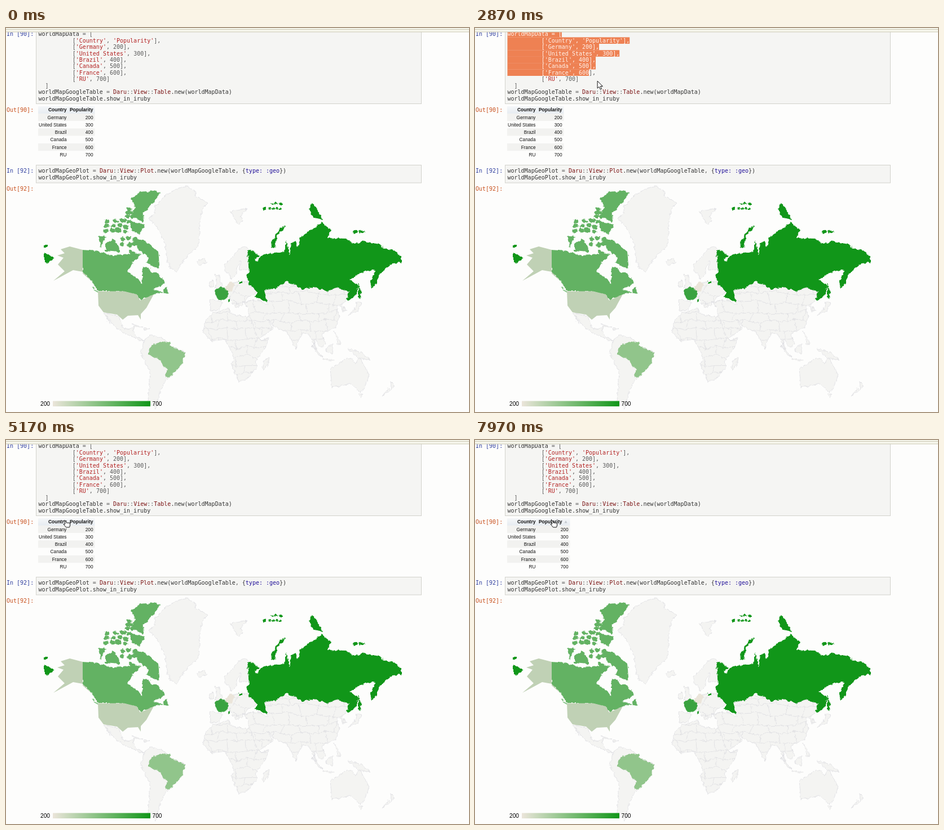
Recreate the animation shown at these times as an HTML page. Size 821 by 682 pixels, loop 8 s.

```html
<!DOCTYPE html>
<html lang="en">
<head>
<meta charset="utf-8">
<title>Notebook world map</title>
<style>
html, body { margin: 0; width: 100%; height: 100%; overflow: hidden; background: #fdfdfc; }
svg { display: block; }
text { white-space: pre; }
.code { font: 10px "DejaVu Sans Mono", monospace; fill: #333; }
.str { fill: #b32222; }
.const { fill: #7a1212; }
.atom { fill: #221199; }
.punct { fill: #5a5a5a; }
.in { fill: #303f9f; }
.out { fill: #c8501c; }
#selection text, #selection tspan { fill: #fff3ec; }
#table { font: 8.25px "Liberation Sans", Arial, sans-serif; fill: #111; text-anchor: end; }
#table .head { font-size: 8.5px; font-weight: bold; }
.legend { font: 10.2px "Liberation Sans", Arial, sans-serif; }
.cell { fill: #f5f5f3; stroke: #d2d2cc; }
.land { fill: #f4f4f2; stroke: #dadade; stroke-width: .7; }
#borders { fill: none; stroke: #dadade; stroke-width: .7; }
.canada { fill: #63b263; }
.usa { fill: #c0d1b5; }
.brazil { fill: #91c58b; }
.france { fill: #3aa340; }
.germany { fill: #ebe5da; }
.russia { fill: #119619; }
</style>
</head>
<body>
<svg width="821" height="682" viewBox="0 0 821 682">
  <defs>
    <filter id="coast" x="0" y="0" width="821" height="682" filterUnits="userSpaceOnUse" color-interpolation-filters="sRGB">
      <feTurbulence type="fractalNoise" baseFrequency=".17" numOctaves="2" seed="4"/>
      <feColorMatrix values="1 0 0 0 0 0 1 0 0 0 0 0 1 0 0 0 0 0 0 1" result="noise"/>
      <feDisplacementMap in="SourceGraphic" in2="noise" scale="6" xChannelSelector="R" yChannelSelector="G"/>
    </filter>
    <linearGradient id="scale"><stop stop-color="#ebe5da"/><stop offset="1" stop-color="#109618"/></linearGradient>
    <linearGradient id="header" x2="0" y2="1"><stop stop-color="#f5f7f9"/><stop offset="1" stop-color="#e7ecf1"/></linearGradient>
    <clipPath id="picked"><rect id="fullRows" width="821"/><rect id="lastRow" height="11.43"/></clipPath>
    <clipPath id="inland"><use href="#africa"/><use href="#asia"/><use href="#europe"/></clipPath>
  </defs>
  <rect width="821" height="682" fill="#fdfdfc"/>

  <g id="map">
    <g filter="url(#coast)">
      <g class="land">
        <path id="greenland" d="M253 338L264 330 264 317 284 297 300 287 322 281 337 291 335 298 358 311 349 320 344 344 342 386 316 411 302 434 290 424 285 408 282 384 268 354Z"/>
        <path id="iceland" d="M337 414L352 410 356 416 343 422Z"/>
        <path id="svalbard" d="M398 326L427 321 416 334 419 342 412 350Z"/>
        <path id="nordics" d="M388 432L388 420 403 405 413 393 424 388 432 392 428 397 432 418 430 428 414 430 417 414 409 425 409 436 400 447 396 436Z"/>
        <path id="britain" d="M371 437L377 439 383 456 381 461 370 463 374 455ZM362 450l6-2 0 10-7 2z"/>
        <path id="iberia" d="M362 482L384 486 378 500 363 503Z"/>
        <path id="europe" d="M389 470L400 453 427 448 436 462 446 468 430 478 424 485 416 495 402 481 413 494 409 498 397 482Z"/>
        <path id="asia" d="M457 467L480 461 490 452 515 459 546 460 570 468 585 461 608 468 608 477 596 491 603 503 597 503 594 494 586 494 592 512 584 532 560 543 567 560 558 568 548 553 546 564 556 580 538 545 528 542 518 554 514 571 500 541 475 530 463 517 474 533 446 555 430 512 430 497 420 487 446 482 464 492Z"/>
        <path id="africa" d="M366 506L395 498 398 506 410 511 433 513 444 546 452 554 466 551 460 568 443 590 445 602 426 625 412 628 400 598 404 584 396 566 388 553 364 556 349 540 354 520Z"/>
        <path id="japan" d="M622 486L631 488 624 502 606 510 618 500Z"/>
        <path id="indonesia" d="M542 562L561 584 552 578ZM568 568L580 561 578 578 570 576ZM562 586l20 4-1 2-19-3zM606 569L630 576 646 590 624 586ZM582 538L594 560 588 562Z"/>
        <path id="australia" d="M575 605L604 586 612 587 620 597 627 585 644 616 636 640 628 647 612 632 578 638ZM625 650h7l-3 6z"/>
        <path id="zealand" d="M682 628l6 6-4 8zM678 640l4 2-15 13z"/>
        <path id="madagascar" d="M466 585L464 600 456 608 456 592Z"/>
        <path id="mexico" d="M173 506L200 512 206 530 214 536 228 530 225 538 233 549 246 555 234 553 208 541 190 528 178 511 185 526Z"/>
        <path id="antilles" d="M222 526l20 5-9 0zM245 532l9 2-10 2z"/>
        <path id="andes" d="M246 553L258 545 280 552 296 568 319 576 308 600 283 627 272 648 266 677 252 664 255 610 239 578Z"/>
      </g>
      <path id="borders" clip-path="url(#inland)"/>
      <g class="canada">
        <path d="M136 394L160 396 190 404 220 402 218 393 227 399 240 401 222 419 215 432 235 446 241 456 243 425 253 426 259 435 266 432 281 450 282 455 260 464 284 470 266 471 238 484 232 474 209 468 163 468 152 449 136 433Z"/>
        <path d="M279 463l5-5 4 14-8-1zM153 460l10 9-5-2z"/>
        <path id="baffin" d="M224 373L247 378 270 397 272 420 270 428 248 416 254 408 234 393Z"/>
        <path id="victoria" d="M176 384L190 374 202 391 201 398 176 396ZM163 369l14 2-9 18z"/>
        <path id="ellesmere" d="M222 303L238 291 262 289 273 293 261 310 244 329 243 345 222 334 229 318ZM213 318l11 2-6 14zM217 342L246 349 237 366 223 359Z"/>
        <path id="arctic"/>
      </g>
      <g class="russia">
        <path d="M428 395L434 394 450 405 441 411 446 414 452 405 474 399 494 398 497 377 503 404 506 382 514 378 517 390 522 372 541 358 560 346 577 359 570 373 602 374 617 383 636 379 662 384 672 391 690 396 701 406 701 417 685 418 660 440 658 452 648 464 646 450 656 429 632 434 609 447 625 458 621 474 604 486 608 468 585 461 570 468 546 460 526 464 498 450 480 461 458 466 463 487 441 477 446 470 432 455 426 441 431 436Z"/>
        <path id="zemlya" d="M471 389L470 381 487 355 497 351 480 370 476 391ZM537 322L541 312 548 316 562 340 545 337Z"/>
        <path id="sakhalin" d="M625 452l5 18-2 12-3-4z"/>
        <path id="chukotka" d="M68 399L86 409 76 417 68 416ZM68 386h4v3h-4zM414 450h5v3h-5z"/>
        <path id="siberian"/>
      </g>
      <path class="brazil" d="M257 564L277 557 290 558 293 567 319 577 310 600 289 622 282 616 287 608 270 588 252 580Z"/>
      <path class="germany" d="M389 460L398 451 404 454 401 468 391 470Z"/>
      <path class="france" d="M370 466L381 459 394 467 393 480 383 484 375 481ZM394 482h2v5h-2z"/>
    </g>
    <g class="usa">
      <path d="M163 467.500H209L232 473 238 484 262 473 249 497 239 508 239 518 234 510 216 511 207 518 197 509 173 505 164 493Z"/>
      <path d="M136 394L113 388 97 393 104 400 91 404 102 408 92 420 104 432 84 449 119 430 136 433 153 451 136 436Z"/>
    </g>
    <rect x="83" y="662.500" width="173" height="9.500" fill="url(#scale)"/>
    <text class="legend" x="61" y="671">200</text>
    <text class="legend" x="259.500" y="671">700</text>
  </g>

  <rect class="cell" x="53.500" y="-5" width="683" height="139.500"/>
  <rect class="cell" x="53.500" y="243.500" width="683" height="31.500"/>
  <g id="source" class="code"></g>
  <g id="selection" class="code" clip-path="url(#picked)"></g>
  <g class="code">
    <text class="in" x="1" y="14.300">In [90]:</text>
    <text class="out" x="1" y="148.500">Out[90]:</text>
    <text class="in" x="1" y="257">In [92]:</text>
    <text class="out" x="1" y="288.500">Out[92]:</text>
  </g>
  <rect width="821" height="7" fill="#f6f6ec"/>
  <path d="M0 2.500H821M0 7H821" stroke="#cbc8b4"/>
  <g id="table"></g>
  <g id="cursor" fill="#fff" stroke="#111" stroke-linejoin="round">
    <path id="arrow" d="M0 0V13L3 10.200 5.200 15 7.400 14 5.300 9.400H9.300Z"/>
    <path id="hand" d="M0 0H2L4 4 10.500 4.300V9L9.500 12H3.500L-1 6.500 2 6Z"/>
  </g>
</svg>
<script>
const $ = id => document.getElementById(id);
const LOOP = 8000, ROW = 11.43, TOP = 5, LEFT = 57.5, CHAR = 6.02, LAG = 130;
const SELECT_START = 1720, SELECT_END = 3550;

const records = [["Germany", 200], ["United States", 300], ["Brazil", 400], ["Canada", 500], ["France", 600], ["RU", 700]];
const dataLines = [
  "worldMapData = [",
  ...["'Country', 'Popularity'],", ...records.map(([name, count], i) => `'${name}', ${count}]${i < 5 ? "," : ""}`)]
    .map(row => " ".repeat(10) + "[" + row),
  "  ]",
  "worldMapGoogleTable = Daru::View::Table.new(worldMapData)",
  "worldMapGoogleTable.show_in_iruby"
];
const plotLines = [
  "worldMapGeoPlot = Daru::View::Plot.new(worldMapGoogleTable, {type: :geo})",
  "worldMapGeoPlot.show_in_iruby"
];

const token = /('[^']*')|\b(Daru|View|Table|Plot)\b|(type:|:geo)|(::|[=[\],]|\b\d+\b)/g;
const highlight = line => line.replace(token, (match, str, constant, atom) =>
  `<tspan class="${str ? "str" : constant ? "const" : atom ? "atom" : "punct"}">${match}</tspan>`);
const codeText = (line, y) => `<text x="${LEFT}" y="${y}">${highlight(line)}</text>`;
const dataText = dataLines.map((line, i) => codeText(line, 14.3 + i * ROW)).join("");

$("source").innerHTML = dataText + plotLines.map((line, i) => codeText(line, 257 + i * 12)).join("");
$("selection").innerHTML = dataLines.map((line, i) =>
  `<rect x="${LEFT}" y="${TOP + i * ROW}" width="${line.length * CHAR}" height="11.6" fill="#ee8153"/>`).join("") + dataText;

let seed = 7;
const random = () => (seed = seed * 16807 % 2147483647) / 2147483647;
const spread = size => (random() - .5) * size;

// Ragged islands on a jittered grid of columns by rows
function archipelago(x, y, columns, rows, step, slant = 0) {
  let d = "";
  for (let n = 0; n < columns * rows; n++) {
    const row = Math.floor(n / columns);
    const cx = x + n % columns * step + row * slant + spread(step / 2), cy = y + row * step * .8 + spread(step / 3);
    const points = Array.from({ length: 7 }, (_, k) => {
      const r = step * (.3 + random() * .25), a = k * Math.PI * 2 / 7;
      return `${cx + r * Math.cos(a)} ${cy + r * .75 * Math.sin(a)}`;
    });
    d += "M" + points.join("L") + "Z";
  }
  return d;
}
$("arctic").setAttribute("d", archipelago(182, 342, 4, 3, 12, -4) + archipelago(206, 375, 3, 2, 11) + archipelago(215, 328, 2, 2, 10));
$("siberian").setAttribute("d", archipelago(460, 320, 5, 1, 7) + archipelago(472, 312, 3, 1, 7) + archipelago(618, 362, 3, 1, 8));

// Inland borders: a jittered brick mesh
const STEP = 16, COLUMNS = 18;
const nodes = Array.from({ length: COLUMNS * 13 }, (_, n) =>
  `${345 + n % COLUMNS * STEP + spread(10)} ${440 + Math.floor(n / COLUMNS) * STEP + spread(10)}`);
$("borders").setAttribute("d", nodes.map((node, n) => {
  const column = n % COLUMNS, row = Math.floor(n / COLUMNS), right = nodes[n + 1], below = nodes[n + COLUMNS];
  return (column < COLUMNS - 1 && right ? `M${node}L${right}` : "") + ((column + row) % 2 && below ? `M${node}L${below}` : "");
}).join(""));

const byName = [...records].sort((a, b) => a[0] < b[0] ? -1 : 1);
const tables = {
  plain: { rows: records },
  nameUp: { rows: byName, country: "up" },
  nameDown: { rows: [...byName].reverse(), country: "down" },
  countUp: { rows: records, popularity: "up" }
};
const sortMark = (x, dir) => dir
  ? `<path fill="#c3c8ce" d="M${x - 2.5} ${dir === "up" ? "147.5h5l-2.500-4.500z" : "143h5l-2.500 4.500z"}"/>` : "";

function drawTable({ rows, country, popularity }) {
  const right = popularity ? 165.5 : 154.5;
  const body = rows.map(([name, count], i) => {
    const y = 161.5 + i * 13.25;
    return `<rect x="57" y="${y - 9.6}" width="${right - 54}" height="13.25" fill="${i % 2 ? "#fdfdfc" : "#f2f2f0"}"/>
      <text x="107.500" y="${y}">${name}</text><text x="${right}" y="${y}">${count}</text>`;
  }).join("");
  $("table").innerHTML = `<rect x="57" y="139" width="${right - 54}" height="13" fill="url(#header)"/>
    <text class="head" x="${country ? 97 : 107.5}" y="148">Country</text>
    <text class="head" x="154.500" y="148">Popularity</text>
    ${sortMark(103, country)}${sortMark(161, popularity)}${body}`;
}

// The pointer rests between moves
const moves = [
  { from: 1250, to: 1500, x: 55, y: 11 },
  { from: SELECT_START, to: 2870, x: 217, y: 94 },
  { from: 2870, to: 3220, x: 256, y: 126 },
  { from: SELECT_END, to: 4050, x: 197, y: 241 },
  { from: 4250, to: 5000, x: 103, y: 143 },
  { from: 5300, to: 5500, x: 91, y: 143 },
  { from: 6800, to: 7250, x: 135, y: 143 }
];
function cursorAt(t) {
  let x = 40, y = -30;
  for (const move of moves) {
    const k = Math.min(1, Math.max(0, (t - move.from) / (move.to - move.from)));
    x += (move.x - x) * k;
    y += (move.y - y) * k;
  }
  return [x, y];
}

function select(t) {
  const active = t > SELECT_START + LAG && t < SELECT_END;
  $("selection").style.display = active ? "" : "none";
  if (!active) return;
  const [x, y] = cursorAt(t - LAG);
  const row = Math.max(0, Math.floor((y - TOP) / ROW));
  const chars = Math.max(0, Math.ceil((x - LEFT) / CHAR));
  $("fullRows").setAttribute("height", TOP + row * ROW);
  $("lastRow").setAttribute("y", TOP + row * ROW);
  $("lastRow").setAttribute("width", LEFT + chars * CHAR);
}

let shown;
function frame(now) {
  const t = now % LOOP;
  const [x, y] = cursorAt(t);
  const overHeader = x < 160 && y > 138 && y < 152;
  $("cursor").setAttribute("transform", `translate(${x.toFixed(1)} ${y.toFixed(1)})`);
  $("arrow").style.display = overHeader ? "none" : "";
  $("hand").style.display = overHeader ? "" : "none";
  select(t);
  const state = t < 5550 ? "plain" : t < 6250 ? "nameUp" : t < 7450 ? "nameDown" : "countUp";
  if (state !== shown) drawTable(tables[shown = state]);
  requestAnimationFrame(frame);
}
frame(performance.now());
</script>
</body>
</html>
```
